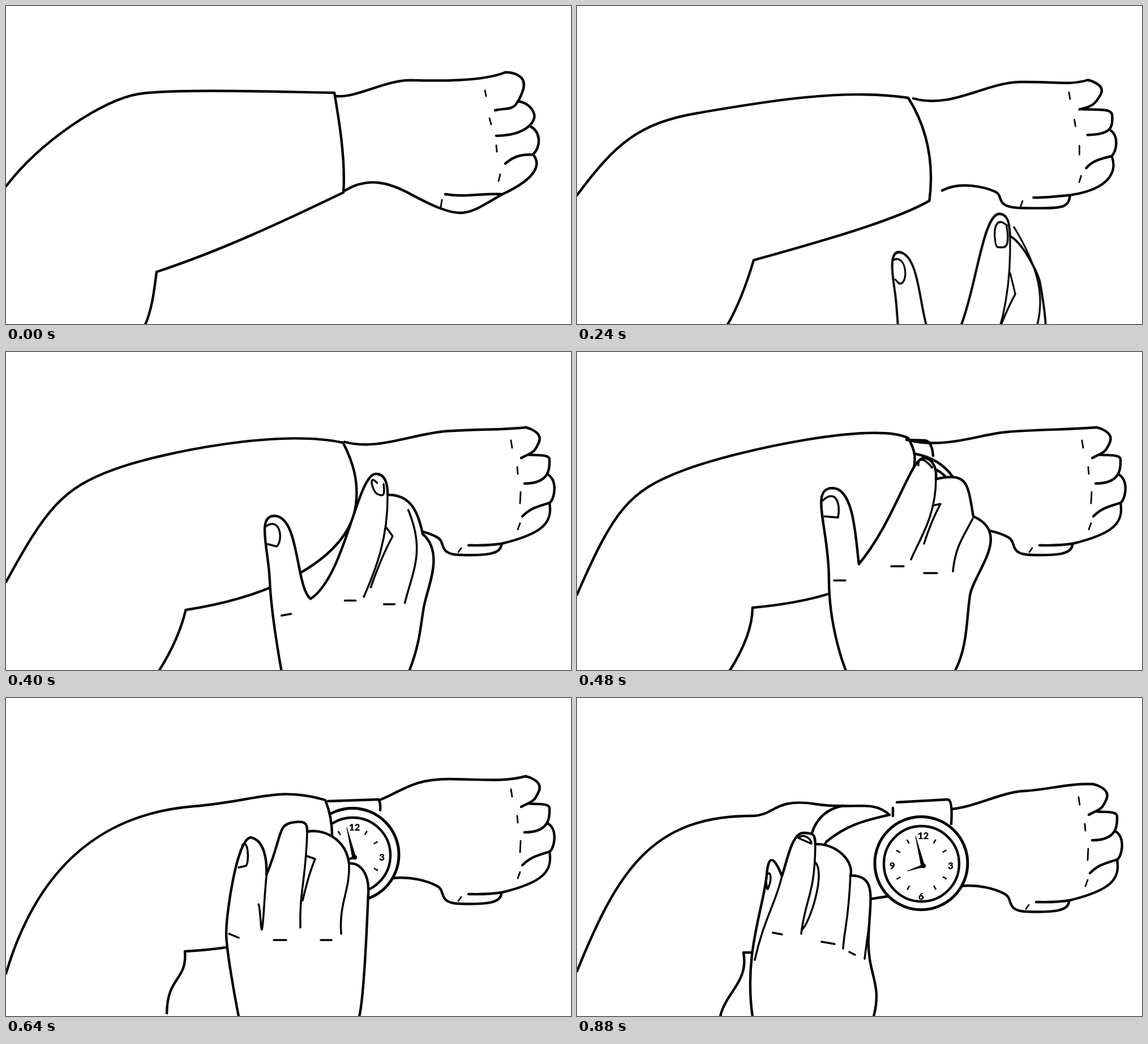
Write an HTML page without scripts that moves like this. It is 998 px wide and 561 px high and loops after 1.76 s.

```html
<!DOCTYPE html>
<html lang="en">
<head>
<meta charset="utf-8">
<title>Checking the time</title>
<style>
html, body { margin: 0; width: 100%; height: 100%; overflow: hidden; background: #fff; }
svg { display: block; width: 100vw; height: 100vh; }
path, circle { fill: none; stroke: #000; stroke-width: 4.4; stroke-linecap: round; stroke-linejoin: round; }
text { font: 900 17px Lato, "Open Sans", sans-serif; text-anchor: middle; }

/* Two drawings per key interval: the pose itself and its in-between */
.ink { animation: 1.76s steps(2) infinite; }
.cut { animation: 1.76s step-end infinite; }
.solid { fill: #fff; }
.thin { stroke-width: 3.5; }
.fine { stroke-width: 2.8; }
#fist { animation-name: fist; }
#fingers { animation-name: fingers; }
#knuckles { animation-name: knuckles; }
#wrist { animation-name: wrist; }
#watch { animation-name: watch; }
#sleeve { animation-name: sleeve; }
#strap { animation-name: strap; }
#reach { animation-name: reach; }
#hand { animation-name: hand; }
#creases { animation-name: creases; }
#ticks { stroke-width: 8; stroke-linecap: butt; stroke-dasharray: 0 .94 .1 .9 .1 .96; }

@keyframes fist {
  0%, 27.27% { transform: none; }
  36.36% { transform: translate(0, 5px); animation-timing-function: step-end; }
  40.9% { transform: translate(5px, 19px); }
  49.99%, to { transform: translate(-6px, 19px); }
}
@keyframes fingers {
  0% { d: path("M882 117S926 116 912 152S892 178 864 184M904 168C920 170 930 180 933 191S922 228 866 229M926 212C944 222 946 246 931 262C916 262 900 262 882 278M931 262C942 275 946 300 877 332C838 330 812 338 776 332M877 332C845 350 825 365 803 365S752 352 715 332S640 300 598 326"); }
  9.09% { d: path("M887 128S920 136 909 152S890 178 865 178M864 183C920 184 932 182 931 200S934 222 888 223M927 222C938 230 940 246 929 264C910 266 892 272 887 282M929 264C940 272 946 324 868 329C840 330 820 336 796 335M866 332C862 362 850 354 778 355S735 335 715 328S640 308 608 338"); }
  18.18%, to { d: path("M918 133S950 140 941 160S930 176 910 187M922 181C940 183 960 180 960 190S964 232 916 232M957 216C976 228 968 262 960 266C942 272 928 274 912 290M960 266C966 300 950 320 876 338C852 342 833 341 817 341M875 338C876 358 845 359 803 358S778 336 762 327S715 309 682 313"); }
}
@keyframes knuckles {
  0%, 9.09% { d: path("M846 149L848 159M854 198L857 209M866 246L867 257M873 297L870 309M770 342L768 355"); }
  18.18%, to { d: path("M892 156L894 169M903 203L904 215M909 247L908 267M908 302L904 313M804 346L799 353"); }
}
@keyframes wrist {
  0% { d: path("M584 159C620 162 672 130 715 131S840 134 882 117"); }
  9.09% { d: path("M576 164C664 186 712 128 765 130S850 142 887 128"); }
  18.18% { d: path("M612 162C660 178 730 142 800 138S890 139 918 133"); }
  27.27% { d: path("M584 155C650 172 710 145 760 141S860 137 918 133"); }
  36.36% { d: path("M660 180C700 164 720 142 785 143S880 148 918 138"); animation-timing-function: step-end; }
  40.9% { d: path("M661 184C700 184 740 156 790 156S870 156 923 152"); }
  49.99%, to { d: path("M662 196C710 190 750 166 790 164S870 150 912 152"); }
}
@keyframes sleeve {
  0% { d: path("M0 318C60 240 170 165 235 155S500 152 580 153C588 200 600 270 596 329C530 360 400 425 266 469C262 500 258 535 246 562"); }
  9.09% { d: path("M0 284C60 210 110 178 235 171S490 138 564 156C592 190 612 240 605 337C540 380 400 412 299 438C293 480 278 530 261 562"); }
  18.18% { d: path("M0 384C75 275 110 235 190 207S440 150 606 168C618 196 656 268 640 350C580 380 420 430 325 459C305 505 285 540 271 562"); }
  27.27% { d: path("M0 428C65 280 90 245 190 208S530 122 585 152C597 172 602 190 589 225C600 350 540 430 310 451C310 490 290 530 270 562"); }
  36.36% { d: path("M0 486C70 250 220 200 332 191S475 155 564 180C574 205 576 225 576 243C570 380 520 435 316 447C320 500 285 490 284 556"); animation-timing-function: step-end; }
  40.9% { d: path("M0 560C66 400 66 230 311 191C350 190 360 167 400 171S545 170 566 206C530 212 520 240 465 252L345 453H301C302 490 288 520 268 557"); }
  49.99%, to { d: path("M0 482C70 310 130 206 312 208C350 206 350 176 420 187S520 178 552 206C520 214 480 220 440 254L345 449H294C304 500 262 520 253 562"); }
}
@keyframes strap {
  0%, 22.72% { d: path("M0 600"); }
  18.18% { d: path("M640 350L655 346"); }
  27.27% { d: path("M582 155L615 156Q627 158 629 183M599 180Q640 188 663 219M622 203Q640 208 650 219"); }
  31.81% { d: path("M569 182L658 179Q662 185 661 198"); }
  40.9% { d: path("M565 184L655 179Q664 180 661 222M551 362L556 357"); }
  49.99%, to { d: path("M565 184L655 179Q664 180 661 222M522 354L548 350M558 194V208M415 238Q428 198 470 190"); }
}
@keyframes watch {
  0% { opacity: 0; }
  31.81% { opacity: 1; transform: translate(-8px, -24px); }
  36.36% { opacity: 1; transform: translate(4px, -15px); }
  40.9%, to { opacity: 1; transform: none; }
}
@keyframes reach {
  0% { transform: translateY(600px); animation-timing-function: step-end; }
  9.09% { transform: matrix(.78, .237, 0, 1, 246, 67); }
  18.18% { transform: none; }
  36.36% { transform: none; animation-timing-function: step-end; }
  40.9% { transform: matrix(1, .367, 0, 1.016, 29, -162); }
  49.99%, to { transform: none; }
}
@keyframes hand {
  0%, 18.18% { d: path("M498 562S492 440 487 410S475 338 497 338C548 340 530 497 578 497C640 490 650 243 695 243C712 243 713 262 714 280C740 290 766 335 772 352C780 390 788 440 782 470S772 510 757 562"); }
  27.27% { d: path("M475 562S445 490 445 400S410 240 452 240C490 242 492 330 498 374C560 300 590 187 612 187C628 187 636 205 634 224C690 212 690 230 700 290C770 320 700 390 694 430S690 520 668 562"); }
  36.36% { d: path("M411 562S389 450 389 415S408 246 433 246C458 252 461 290 460 312C490 240 478 222 510 219C525 217 533 219 532 236C556 230 600 245 606 292C626 290 642 310 640 345S634 520 624 562"); animation-timing-function: step-end; }
  40.9%, to { d: path("M312 620L310 562C294 450 330 370 335 312S360 310 362 314C372 284 380 238 400 238S420 242 421 258C460 256 490 290 483 313C530 314 518 350 515 420S540 500 524 562V620"); }
}
@keyframes creases {
  0%, 18.18% { d: path("M714 280C716 370 700 440 674 498M676 492Q700 425 724 382L714 346M722 263C800 370 772 420 745 498M708 262C676 240 682 305 690 303S716 310 707 262M485 353C512 340 514 396 495 394L488 388M519 527L533 521M642 499H658M722 500H737"); }
  27.27% { d: path("M634 224C634 290 605 330 590 366M613 338Q625 300 642 268L628 271M699 294C680 330 668 345 664 387M603 200C602 186 612 188 622 198S624 202 627 204M434 262C458 240 466 270 461 292L437 290M454 403L474 403M555 378H577M613 390H636"); }
  36.36% { d: path("M532 236C530 320 518 340 520 405M524 357Q535 310 546 284L532 279M606 292C608 340 588 360 592 416M461 305C456 350 456 380 453 403S450 370 446 364M417 260C428 246 430 290 424 296L411 299M394 416L411 423M473 427H495M556 427H575"); animation-timing-function: step-end; }
  40.9%, to { d: path("M362 314C352 360 330 390 314 462M421 258C420 350 404 350 396 416M483 313C480 390 472 410 470 442M391 247C400 238 414 248 414 257ZM336 337C328 296 352 304 337 337M421 290C440 310 410 400 397 409M516 400L508 460M346 414L362 417M432 430L455 434M481 448L491 453"); }
}
</style>
</head>
<body>
<svg viewBox="0 0 998 561" preserveAspectRatio="none">
  <g id="fist" class="ink">
    <path id="fingers" class="ink"/>
    <path id="knuckles" class="ink fine"/>
  </g>
  <path id="wrist" class="ink"/>
  <g id="watch" class="cut">
    <circle class="solid" cx="608" cy="291.5" r="82" style="stroke-width:5"/>
    <circle cx="608.5" cy="292.5" r="66.5"/>
    <circle id="ticks" cx="608.5" cy="294" r="47" pathLength="12"/>
    <path d="M598 244L608 297L613 294ZM584 305L611 294V298Z" style="fill:#000;stroke-width:1"/>
    <circle cx="612" cy="296" r="2" style="fill:#000"/>
    <text x="611.5" y="249">12</text>
    <text x="660" y="302">3</text>
    <text x="608" y="356">6</text>
    <text x="557" y="302">9</text>
  </g>
  <path id="sleeve" class="ink solid"/>
  <path id="strap" class="cut"/>
  <g id="reach" class="ink">
    <path id="hand" class="ink solid"/>
    <path id="creases" class="ink thin"/>
  </g>
</svg>
</body>
</html>
```
